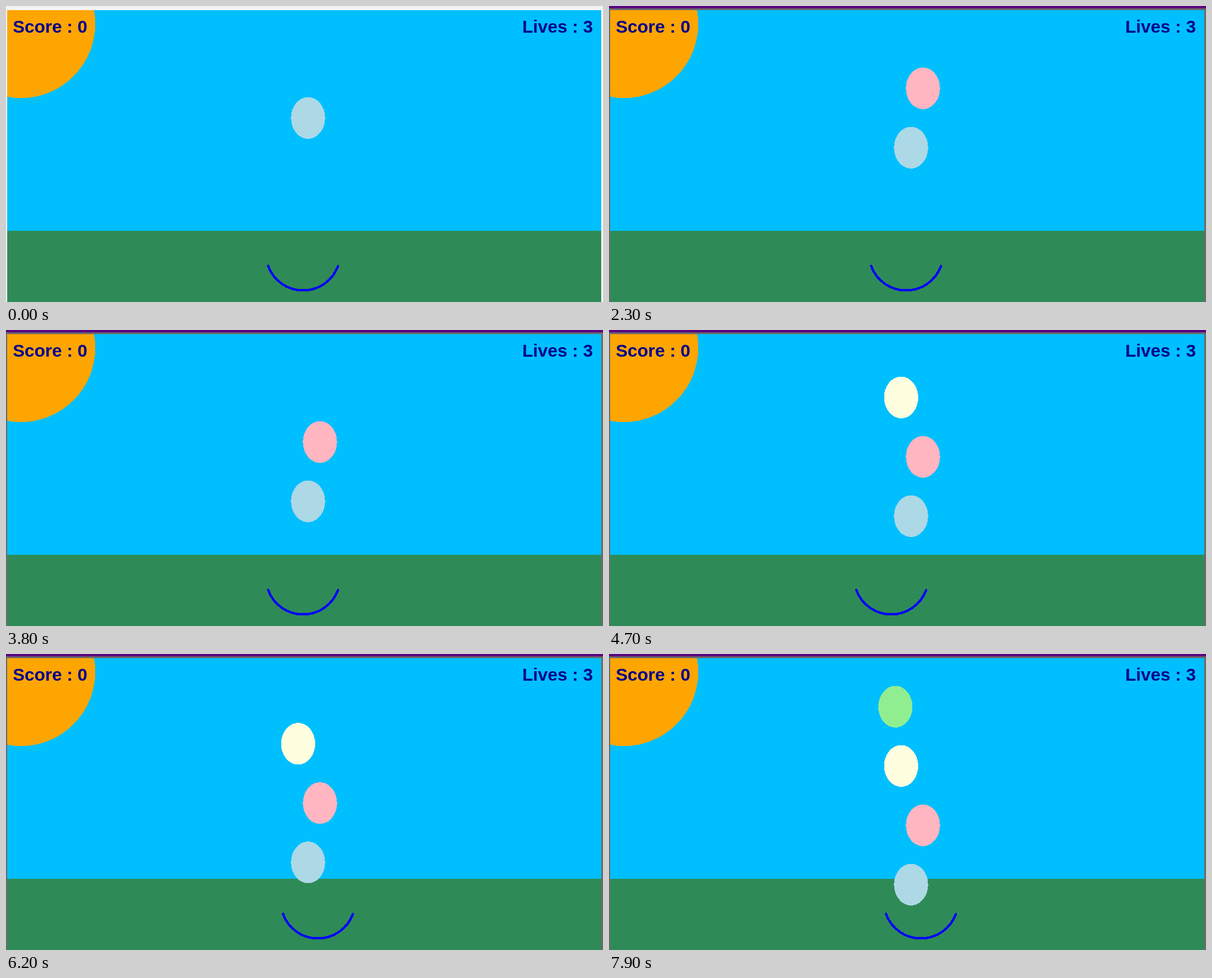
These frames come from a looping animation (1004x499 px, 8 s). An HTML page:

```html
<!DOCTYPE html>
<html lang="en">
<head>
<meta charset="utf-8">
<title>Egg catcher</title>
<style>
  html, body { margin: 0; width: 100%; height: 100%; overflow: hidden; }
  svg { display: block; width: 1004px; height: 499px; }
  text { font: bold 29.7px "Liberation Sans", Arial, sans-serif; fill: #00008b; }
</style>
</head>
<body>
<svg viewBox="0 0 1004 499" shape-rendering="crispEdges">
  <defs>
    <clipPath id="field"><rect x="2" y="7" width="999" height="492"/></clipPath>
  </defs>
  <rect width="1004" height="499" fill="#f3f3f3"/>
  <g id="focused">
    <rect width="1004" height="499" fill="#6b6b6b"/>
    <rect width="1004" height="4" fill="#59007f"/>
  </g>
  <g clip-path="url(#field)">
    <rect width="1004" height="499" fill="#00bfff"/>
    <rect y="379" width="1004" height="120" fill="#2e8b57"/>
    <circle cx="25" cy="30" r="125.2" fill="#ffa500"/>
  </g>
  <text x="11.4" y="45">Score : 0</text>
  <text x="987" y="45" text-anchor="end">Lives : 3</text>
  <path id="catcher" fill="none" stroke="#00f" stroke-width="4" stroke-linecap="round"/>
  <g id="eggs"></g>
  <path id="cursor" d="M.5 .5V17.2L4.3 13.5 6.9 19.4 9.7 18.2 7.2 12.4H12.3Z"
        fill="#fff" stroke="#000" shape-rendering="auto"/>
</svg>
<script>
const LOOP = 8000, TICK = 100, FOCUS_AT = 400;
const FIRST_DROP = 425, DROP_EVERY = 475, FALL = 12.5;
const FIRST_SPAWN = 350, SPAWN_EVERY = 3750, EGG_GAP = 100;
const CATCHER_STEP = 25;

const eggs = [
  { x: 508, color: '#add8e6' },
  { x: 528, color: '#ffb6c1' },
  { x: 491.3, color: '#ffffe0' },
  { x: 481.6, color: '#90ee90' }
];

// Bursts of arrow keys, evenly spaced in time
const bursts = [
  { at: 2000, gap: 300, keys: '><' },
  { at: 2900, gap: 900, keys: '><' },
  { at: 4000, gap: 800, keys: '<<' },
  { at: 5100, gap: 200, keys: '<>>>>' }
];

const byId = id => document.getElementById(id);
const show = (el, on) => el.setAttribute('visibility', on ? 'visible' : 'hidden');
const place = (el, x, y) => el.setAttribute('transform', `translate(${x} ${y})`);
const countSince = (t, start, every) => Math.max(0, Math.floor((t - start) / every) + 1);

const radius = 62.5, dip = 20 * Math.PI / 180;
const half = radius * Math.cos(dip), endY = radius * Math.sin(dip);
byId('catcher').setAttribute('d', `M${-half} ${endY}A${radius} ${radius} 0 0 0 ${half} ${endY}`);

for (const egg of eggs) {
  egg.el = document.createElementNS('http://www.w3.org/2000/svg', 'ellipse');
  egg.el.setAttribute('rx', 28.7);
  egg.el.setAttribute('ry', 35.2);
  egg.el.setAttribute('fill', egg.color);
  byId('eggs').append(egg.el);
}

function catcherX(t) {
  let x = 499.6;
  for (const { at, gap, keys } of bursts) {
    for (const key of keys.slice(0, countSince(t, at, gap))) {
      x += key === '>' ? CATCHER_STEP : -CATCHER_STEP;
    }
  }
  return x;
}

function render(t) {
  show(byId('focused'), t >= FOCUS_AT);

  const drops = countSince(t, FIRST_DROP, DROP_EVERY);
  const spawned = countSince(t, FIRST_SPAWN, SPAWN_EVERY);
  eggs.forEach((egg, i) => {
    show(egg.el, i <= spawned);
    place(egg.el, egg.x, 188.8 - i * EGG_GAP + drops * FALL);
  });

  place(byId('catcher'), catcherX(t), 417);

  // The pointer sweeps down through the window
  const sweep = (t - 900) / TICK;
  show(byId('cursor'), t >= 500 && t < 1200);
  place(byId('cursor'), 184 - sweep * 14, 321 + sweep * 72);
}

function frame() {
  const t = performance.now() % LOOP;
  render(t - t % TICK);
  requestAnimationFrame(frame);
}
frame();
</script>
</body>
</html>
```
